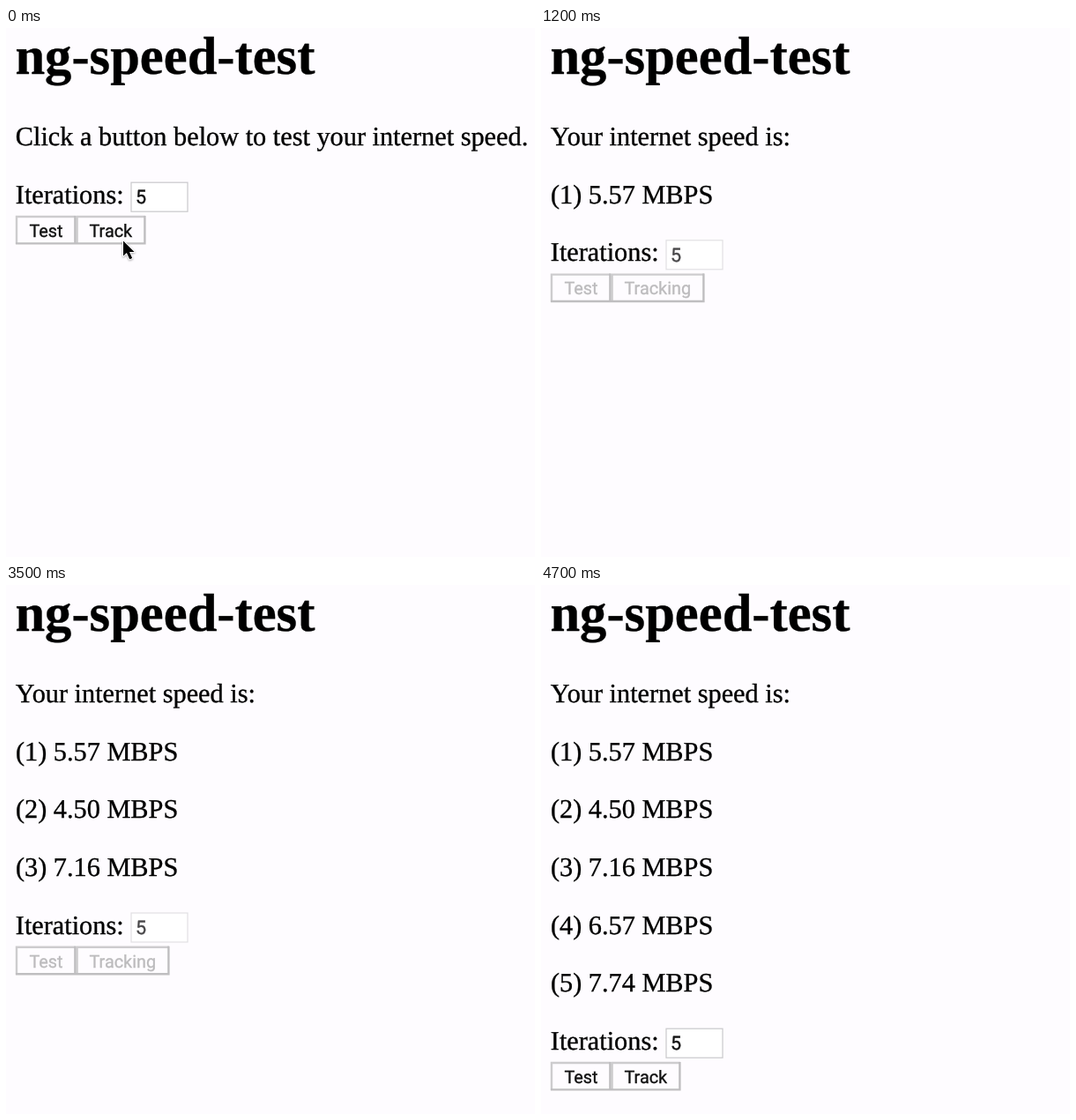
Animation, 600 px wide and 600 px high, one loop 4.9 s. Source, as an HTML page:

```html
<!DOCTYPE html>
<html lang="en">
<head>
<meta charset="utf-8">
<title>ng-speed-test</title>
<style>
  html, body { margin: 0; height: 100%; overflow: hidden; background: #fefcff; }
  svg { display: block; width: 100vw; height: 100vh; }

  text {
    font: 30.3px "Liberation Serif", "Times New Roman", serif;
    fill: #000; stroke: #000; stroke-width: .35; white-space: pre;
    text-rendering: geometricPrecision;
  }
  .title { font-size: 60.6px; font-weight: bold; }
  .ui text { font: 19.9px Roboto, Arial, sans-serif; fill: #111; stroke: #111; }
  .ui .value { font-size: 21.5px; }
  .ui.busy text { fill: #bcbbbd; stroke: #bcbbbd; }
  .ui.busy .value { fill: #484749; stroke: #484749; }

  .field { fill: #fff; stroke: #c9c8cb; stroke-width: 1.2; }
  .busy .field { stroke: #e1e0e3; }
  .lit, .shade { fill: none; stroke-width: 2.4; }
  .lit { stroke: #cdccce; }
  .shade { stroke: #bfbec0; }
  .pointer { filter: drop-shadow(0 1px 1px #0005); }

  /* One 4.9 s loop; every change is a hard cut. */
  .prompt, .speed, .idle, .busy, .form, .pointer, .row {
    animation: 4.9s step-end infinite;
  }
  .prompt { animation-name: prompt; }
  .speed { animation-name: speed; }
  .idle { animation-name: idle; }
  .busy { animation-name: busy; }
  .form { animation-name: form; }
  .pointer { animation-name: pointer; }
  .r1 { animation-name: r1; }
  .r2 { animation-name: r2; }
  .r3 { animation-name: r3; }
  .r4 { animation-name: r4; }
  .r5 { animation-name: r5; }

  @keyframes prompt { 0% { visibility: visible } 6.122%, 100% { visibility: hidden } }
  @keyframes speed { 0% { visibility: hidden } 6.122%, 100% { visibility: visible } }
  @keyframes idle {
    0% { visibility: visible }
    6.122% { visibility: hidden }
    95.918%, 100% { visibility: visible }
  }
  @keyframes busy {
    0% { visibility: hidden }
    6.122% { visibility: visible }
    95.918%, 100% { visibility: hidden }
  }
  @keyframes pointer { 0% { visibility: visible } 10.204%, 100% { visibility: hidden } }
  @keyframes form {
    0% { transform: translateY(0) }
    6.122% { transform: translateY(-30.2px) }
    24.489% { transform: translateY(65.6px) }
    48.979% { transform: translateY(131.2px) }
    65.306% { transform: translateY(196.8px) }
    81.632% { transform: translateY(262.4px) }
    95.918%, 100% { transform: translateY(328px) }
  }
  @keyframes r1 { 0% { visibility: hidden } 24.489%, 100% { visibility: visible } }
  @keyframes r2 { 0% { visibility: hidden } 48.979%, 100% { visibility: visible } }
  @keyframes r3 { 0% { visibility: hidden } 65.306%, 100% { visibility: visible } }
  @keyframes r4 { 0% { visibility: hidden } 81.632%, 100% { visibility: visible } }
  @keyframes r5 { 0% { visibility: hidden } 95.918%, 100% { visibility: visible } }
</style>
</head>
<body>
<svg viewBox="0 0 600 600">
  <text class="title" x="10.4" y="51.5">ng-speed-test</text>

  <text class="prompt" x="10.8" y="133.3">Click a button below to test your internet speed.</text>
  <text class="speed" x="10.8" y="133.3">Your internet speed is:</text>

  <text class="row r1" x="10.9" y="198.8">(1) 5.57 MBPS</text>
  <text class="row r2" x="10.9" y="264.4">(2) 4.50 MBPS</text>
  <text class="row r3" x="10.9" y="330">(3) 7.16 MBPS</text>
  <text class="row r4" x="10.9" y="395.6">(4) 6.57 MBPS</text>
  <text class="row r5" x="10.9" y="461.2">(5) 7.74 MBPS</text>

  <g class="form">
    <text x="10.8" y="198.8">Iterations:</text>

    <g class="ui idle">
      <rect class="field" x="142" y="175.2" width="64" height="33"/>
      <text class="value" x="147" y="199.3">5</text>
      <path class="lit" d="M12 245V214H79M80.6 245V214H158"/>
      <path class="shade" d="M11 244.4H78.4V213M79.6 244.4H157.4V213"/>
      <text x="26.4" y="236.9">Test</text>
      <text x="94.4" y="236.9">Track</text>
    </g>

    <g class="ui busy">
      <rect class="field" x="142" y="175.2" width="64" height="33"/>
      <text class="value" x="147" y="199.3">5</text>
      <path class="lit" d="M12 245V214H79M80.6 245V214H185"/>
      <path class="shade" d="M11 244.4H78.4V213M79.6 244.4H184.4V213"/>
      <text x="26.4" y="236.9">Test</text>
      <text x="94.4" y="236.9">Tracking</text>
    </g>
  </g>

  <path class="pointer" fill="#000" stroke="#fff" stroke-width="2" stroke-linejoin="round" paint-order="stroke"
        d="M133 241.5V258.6L136.9 255L140.2 262.2L143.2 260.9L140 253.9H145.6Z"/>
</svg>
</body>
</html>
```
